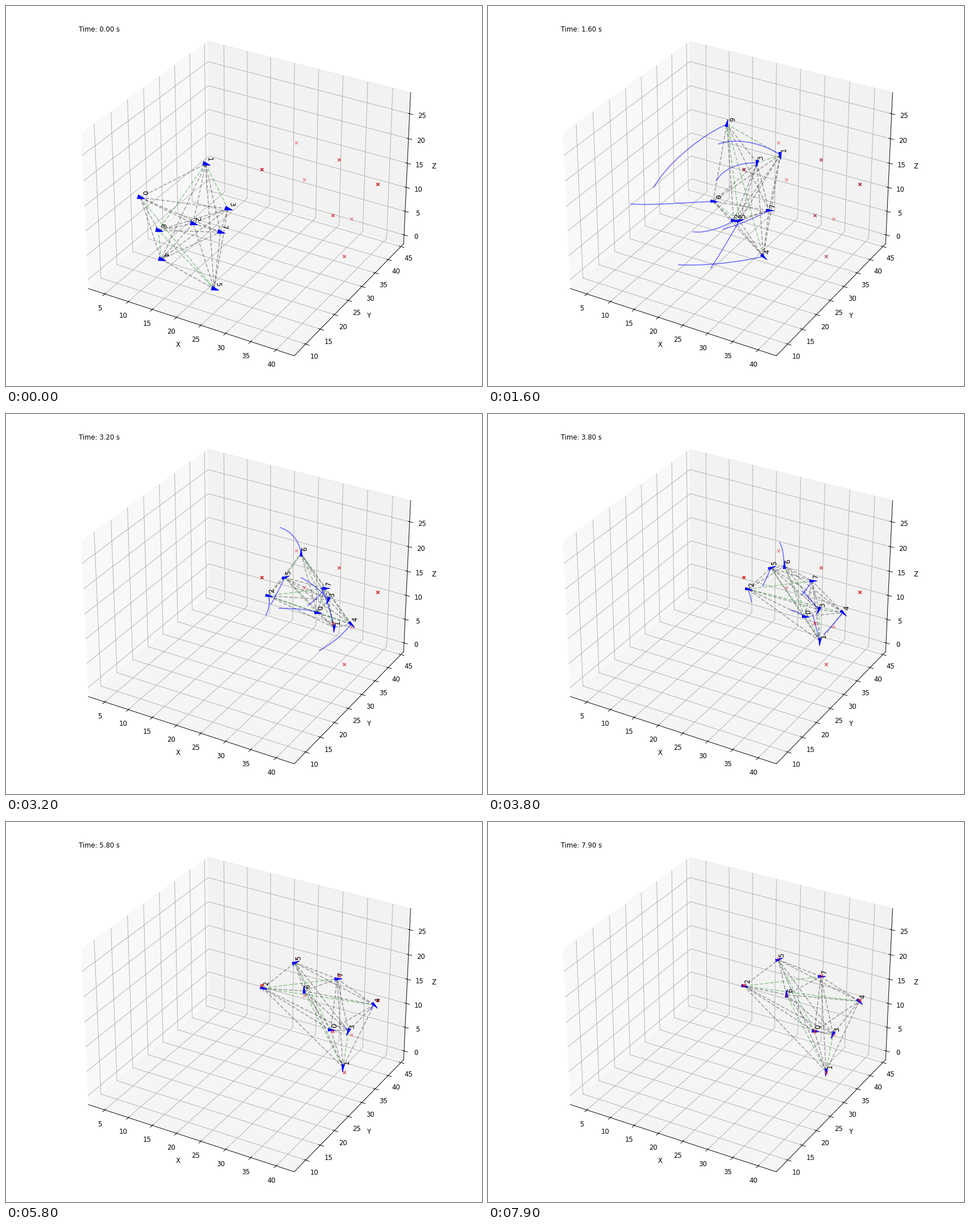
These frames come from a looping animation (837 by 669 pixels, 8 s). A matplotlib script:

```python
import itertools

import matplotlib.pyplot as plt
import numpy as np
from matplotlib.animation import FuncAnimation
from matplotlib.collections import LineCollection, PolyCollection

W, H, DPI = 837, 669, 83.7
FULL_H = H + 0.45   # the part pixel only affects how text is rounded
FRAMES, STEP, TRAIL = 80, 0.1, 10
DECAY = 0.75        # rate of the final approach to the goals
CENTRE_X = 427.2    # where the vertical axis looks upright

# Waypoints of the agents on screen; after the last they settle on the goals
KEYS = np.array([0, 0.7, 1.6, 3.2])
WAYPOINTS = np.array([
    [(236, 337), (258, 349), (396, 344), (547, 350)],
    [(351, 278), (415, 240), (514, 262), (577, 376)],
    [(329, 383), (366, 398), (432, 378), (461, 320)],
    [(390, 357), (405, 302), (473, 276), (567, 327)],
    [(273, 446), (347, 456), (484, 441), (607, 370)],
    [(366, 498), (396, 455), (442, 378), (490, 288)],
    [(268, 395), (299, 307), (420, 208), (519, 246)],
    [(377, 398), (420, 391), (494, 360), (561, 307)],
], float).swapaxes(0, 1)
GOALS = np.array([(575, 369), (595, 441), (450, 288), (608, 375),
                  (654, 314), (511, 241), (525, 306), (586, 271)], float)
GOAL_ALPHA = np.array([0.7, 0.65, 0.95, 0.4, 0.9, 0.4, 0.4, 0.7])

# All arrows start with one heading and turn to their own, in degrees
START_ANGLE = 16
END_ANGLES = np.array([5, 96, 12, 115, 45, -20, -90, 0])

PAIRS = list(itertools.combinations(range(8), 2))
GREY, GREEN = (0, 0, 0, 0.32), (0, 0.5, 0, 0.35)
BRIGHT, DARK = np.array([0.88, 0.07, 0.08]), np.array([0.5, 0.05, 0.13])


def spline_slopes():
    """Slopes of a cubic spline, free at the start and joining the decay."""
    h = np.diff(KEYS)
    chord = np.diff(WAYPOINTS, axis=0) / h[:, None, None]
    n = len(KEYS)
    a, b = np.eye(n), np.empty_like(WAYPOINTS)
    a[0, :2], b[0] = (2, 1), 3 * chord[0]
    for i in range(1, n - 1):
        p, q = h[i - 1], h[i]
        a[i, i - 1:i + 2] = q, 2 * (p + q), p
        b[i] = 3 * (q * chord[i - 1] + p * chord[i])
    b[-1] = DECAY * (GOALS - WAYPOINTS[-1])
    return np.linalg.solve(a, b.reshape(n, -1)).reshape(b.shape)


SLOPES = spline_slopes()


def position(t):
    """Screen positions of all agents at time t."""
    if t >= KEYS[-1]:
        return GOALS + (WAYPOINTS[-1] - GOALS) * np.exp(-DECAY * (t - KEYS[-1]))
    k = np.searchsorted(KEYS, t, side="right") - 1
    h = KEYS[k + 1] - KEYS[k]
    s = (t - KEYS[k]) / h
    p, q = WAYPOINTS[k:k + 2]
    return (p + (q - p) * s * s * (3 - 2 * s)
            + h * s * (1 - s) * (SLOPES[k] * (1 - s) - SLOPES[k + 1] * s))


TRACK = np.array([position(i * STEP) for i in range(FRAMES)])


def arrows_at(t, pos):
    turn = 1 - np.exp(-1.3 * t)
    angle = np.radians(START_ANGLE + (END_ANGLES - START_ANGLE) * turn)
    ahead = np.column_stack([np.cos(angle), np.sin(angle)])
    side = ahead[:, ::-1] * (-1, 1) * (3.5 - 1.3 * turn)
    back = pos - 4.5 * ahead
    return np.stack([back + side, back - side, pos + 8.5 * ahead], axis=1)


def green_pairs(t):
    pairs = {(0, 5), (1, 3), (1, 6)}
    if t < 3.8:
        pairs |= {(4, 6), (5, 6)}
    if t > 2.4:
        pairs |= {(2, 4), (2, 7)}
    return pairs


fig = plt.figure(figsize=(W / DPI, FULL_H / DPI), dpi=DPI)

# The 3D frame: panes, grid and axes
SIDE, PAD = 644.49, 12.555
box = fig.add_axes([(W - SIDE) / 2 / W, PAD / FULL_H, SIDE / W, SIDE / FULL_H],
                   projection="3d")
box.set(xlim=(1.5, 43.53), ylim=(6.16, 46.13), zlim=(-1.88, 29.21),
        xticks=range(5, 41, 5), yticks=range(10, 46, 5), zticks=range(0, 26, 5),
        xlabel="X", ylabel="Y", zlabel="Z")
clock = box.text2D(0.05, 0.95, "", transform=box.transAxes)

# The agents, drawn in screen pixels
ax = fig.add_axes([0, 0, 1, 1])
ax.axis("off")
ax.set(xlim=(0, W), ylim=(H, H - FULL_H))
links = LineCollection([], linestyles="--", linewidths=1.5, zorder=1)
trails = LineCollection([], colors=[(0, 0, 1, 0.5)], linewidths=1.5, zorder=2)
arrows = PolyCollection([], facecolors="blue", edgecolors="blue", linewidths=0.8, zorder=3)
for coll in (links, trails, arrows):
    ax.add_collection(coll, autolim=False)
goals = ax.scatter(*GOALS.T, s=20, marker="x", linewidths=1.5, color="red", zorder=4)
labels = [ax.text(0, 0, str(i), ha="left", va="bottom", zorder=5) for i in range(8)]


def update(n):
    t = n * STEP
    pos = TRACK[n]
    clock.set_text(f"Time: {t:.2f} s")

    green = green_pairs(t)
    links.set_segments([pos[list(p)] for p in PAIRS])
    links.set_color([GREEN if p in green else GREY for p in PAIRS])
    trails.set_segments([TRACK[max(0, n - TRAIL):n + 1, i] for i in range(8)])
    arrows.set_verts(arrows_at(t, pos))

    # The nearer goals darken briefly, then brighten again
    shade = np.interp(t, [0, 0.7, 3.2, 4.5], [0.2, 1, 0.15, 0])
    mix = (shade * (GOAL_ALPHA > 0.5))[:, None]
    goals.set_color(np.column_stack([BRIGHT + (DARK - BRIGHT) * mix, GOAL_ALPHA]))

    # Labels follow the vertical axis and flip where it looks upright
    for label, (x, y) in zip(labels, pos):
        tilt = 0.0096 * (CENTRE_X - x)
        label.set_position((x, y - 5))
        label.set_rotation(tilt + (90 if x >= CENTRE_X else -90))
    return [clock, links, trails, arrows, goals, *labels]


anim = FuncAnimation(fig, update, frames=FRAMES, interval=100, repeat=True,
                     repeat_delay=0, init_func=lambda: update(0), blit=False)
plt.show()
```
